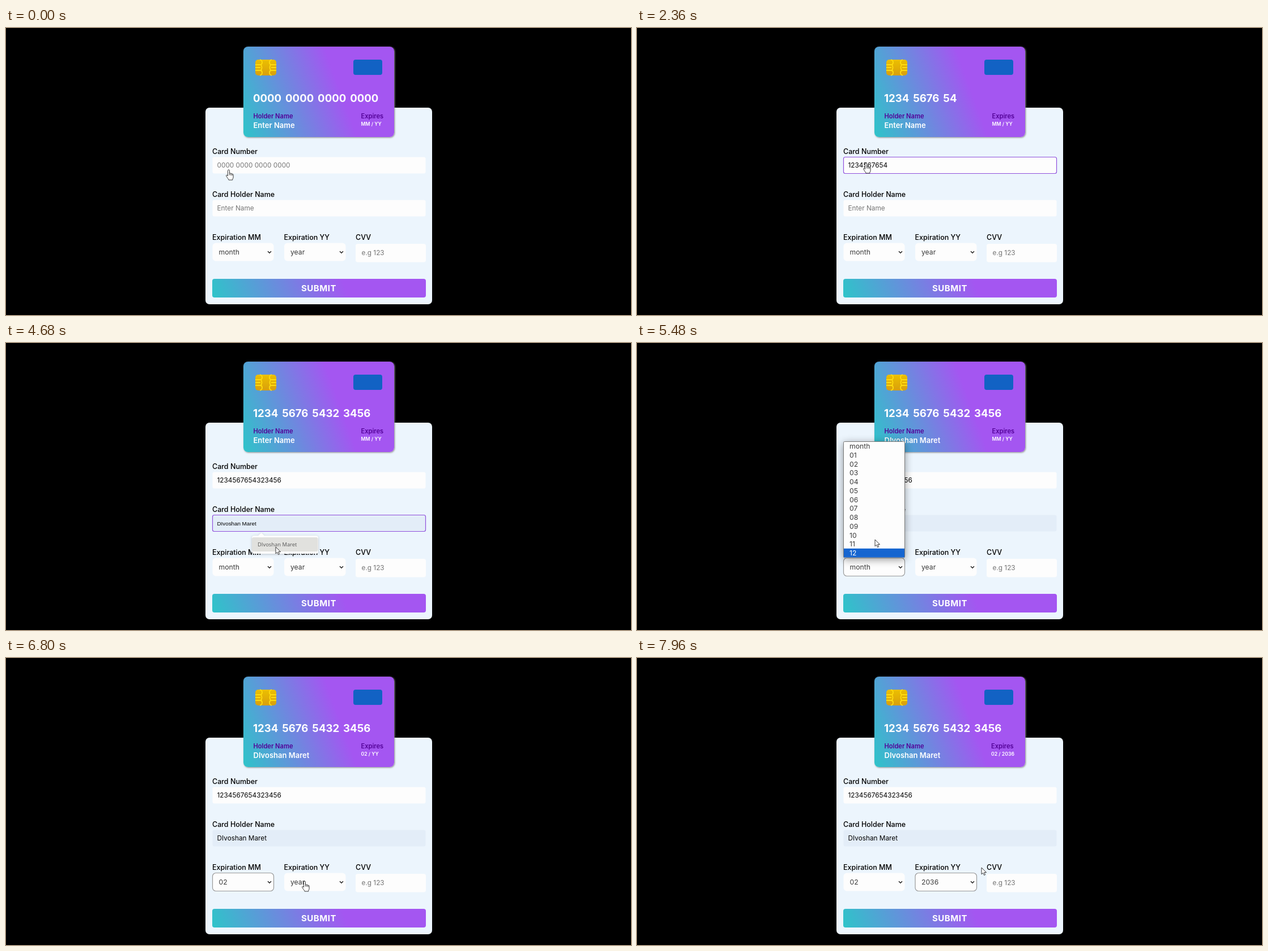
Write an HTML page that moves like this. It is 1103 by 508 pixels and loops after 8 s.

```html
<!DOCTYPE html>
<html lang="en">
<head>
<meta charset="utf-8">
<title>Card form</title>
<style>
  html, body { margin: 0; width: 100%; height: 100%; overflow: hidden; background: #000; }
  div, svg { position: absolute; }
  svg { left: 0; top: 0; }
  .form { left: 352px; top: 141px; width: 400px; height: 348px; border-radius: 7px; background: #ecf5fd; }
  .fill { background: linear-gradient(70deg, #2ec4c9, #a456f1 62%); }
  .card { left: 419px; top: 33px; width: 266px; height: 160px; border-radius: 8px; box-shadow: 1px 1px 3px #8a8a8a; }
  .button { left: 364px; top: 444px; width: 377px; height: 33px; border-radius: 4px; }
  text { font: 400 11.8px Inter, "Open Sans", sans-serif; fill: #000; white-space: pre; }
  .label { font-size: 12.5px; font-weight: 500; }
  .hint { fill: #757575; }
  .pick { font-size: 12.2px; fill: #3a3a3a; }
  .number { font-size: 18.6px; font-weight: 700; fill: #fff; word-spacing: 2.5px; }
  .cap { font-size: 11.1px; font-weight: 600; fill: #520097; }
  .name { font-size: 13px; font-weight: 600; fill: #fff; }
  .date { font-size: 8.7px; font-weight: 600; fill: #fff; }
  .submit { font-size: 15px; font-weight: 700; fill: #fff; letter-spacing: .5px; text-anchor: middle; }
  .preview { font: 9.8px "Liberation Sans", sans-serif; }
  .tip { font: 9.4px "Open Sans", sans-serif; fill: #555; }
  .list { filter: drop-shadow(0 3px 7px rgba(0, 0, 0, .4)); }
  .suggest { filter: drop-shadow(0 1px 2px rgba(0, 0, 0, .2)); }
  .pointer path { fill: #fff; stroke: #222; stroke-width: .9; stroke-linejoin: round; }
</style>
</head>
<body>
<div class="form"></div>
<div class="fill card"></div>
<div class="fill button"></div>
<svg id="stage" width="1103" height="508" viewBox="0 0 1103 508"></svg>
<script>
const LOOP = 8000, ROW = 15.73, LIST_BOTTOM = 379.5;
const HOLDER = 'DIvoshan Maret', DIGITS = '1234567654323456';
const TYPE_START = 1440, TYPE_STEP = 98;

// Pointer tip: time, x, y, shape from then on
const PATH = [
  [0, 393, 251, 'hand'], [120, 393, 251, 'hand'], [800, 404, 239, 'hand'],
  [3060, 404, 239, 'hand'], [3460, 409, 332, 'hand'], [3560, 409, 332, 'hand'],
  [3760, 421, 316, 'hand'], [4080, 423, 316, 'hand'], [4360, 452, 342, 'arrow'],
  [4620, 476, 361, 'arrow'], [4820, 476, 361, 'arrow'], [5120, 422, 396, 'hand'],
  [5280, 421, 394, 'arrow'], [5380, 421, 384, 'arrow'], [5480, 420, 348, 'arrow'],
  [6140, 405, 213, 'arrow'], [6360, 405, 213, 'arrow'], [6520, 455, 310, 'arrow'],
  [6680, 519, 385, 'hand'], [6780, 527, 395, 'hand'], [6960, 527, 395, 'arrow'],
  [7460, 541, 308, 'arrow'], [7680, 541, 308, 'arrow'], [7940, 608, 371, 'arrow'],
  [8000, 608, 371, 'arrow']
];

const rect = (x, y, w, h, r, fill, more = '') =>
  `<rect x="${x}" y="${y}" width="${w}" height="${h}" rx="${r}" fill="${fill}" ${more}/>`;
const text = (x, y, cls, str, id = '') =>
  `<text x="${x}" y="${y}" class="${cls}" id="${id}">${str}</text>`;
const chevron = x =>
  `<path d="M${x - 3} 395.3l3 3 3-3" fill="none" stroke="#222" stroke-width="1.5"/>`;
const outline = (id, color, w = 1.2) => `id="${id}" stroke="${color}" stroke-width="${w}"`;

function list(id, x, rows) {
  const h = rows.length * ROW, top = LIST_BOTTOM - h;
  const items = rows.map((r, i) =>
    text(x + 11, top + i * ROW + 12.2, i ? 'pick' : 'pick hint', r)).join('');
  return `<g id="${id}" class="list">` +
    rect(x + .5, top - .5, 108, h + 1, 2, '#fdfdfd', 'stroke="#777"') +
    rect(x + 1, top, 107, ROW, 0, '#1565d0', `id="${id}Bar"`) + items + '</g>';
}

const months = ['month', ...Array.from({ length: 12 }, (_, i) => String(i + 1).padStart(2, '0'))];
const years = ['year', ...Array.from({ length: 20 }, (_, i) => String(2021 + i))];

const chip = `<defs><linearGradient id="gold" x2="0" y2="1">
    <stop stop-color="#ecc000"/><stop offset="1" stop-color="#d99f0c"/></linearGradient></defs>` +
  rect(440, 56, 37, 28, 5, 'url(#gold)') +
  `<path fill="none" stroke="#ffdc10" stroke-width="1.8" d="M440 65h8q4 0 4-4t-4-5M440 75h8q4 0 4 4t-4 5
    M477 65h-8q-4 0-4-4t4-5M477 75h-8q-4 0-4 4t4 5M440 70h9M468 70h9M450 65q3 5 0 10M467 65q-3 5 0 10"/>`;

document.getElementById('stage').innerHTML =
  chip + rect(613, 56, 51, 27, 4, '#1262c4') +
  text(436, 131, 'number', '', 'number') +
  text(436.5, 160, 'cap', 'Holder Name') + text(436.5, 176.5, 'name', '', 'name') +
  text(626.5, 160, 'cap', 'Expires', 'expires') + text(626.5, 173, 'date', '', 'date') +
  text(364, 222.5, 'label', 'Card Number') +
  text(364, 299, 'label', 'Card Holder Name') +
  text(364, 374.7, 'label', 'Expiration MM') +
  text(490.5, 374.7, 'label', 'Expiration YY') +
  text(617, 374.7, 'label', 'CVV') +
  rect(364.5, 228.5, 376, 29, 3, '#fdfdfd', outline('numberBox', '#8f4fdc')) +
  text(372.5, 246.8, '', '', 'numberText') +
  rect(364.5, 304.5, 376, 29, 3, '#fdfdfd', outline('holderBox', '#8f4fdc')) +
  text(372.5, 323, '', '', 'holderText') +
  rect(364.5, 380.5, 108, 32, 6, '#fdfdfd', outline('monthBox', '#999')) +
  rect(491, 380.5, 108.5, 32, 6, '#fdfdfd', outline('yearBox', '#999')) +
  rect(617, 382, 124, 32.5, 4, '#fdfdfd') +
  text(375.5, 401.2, 'pick', '', 'monthText') + text(502, 401.2, 'pick', '', 'yearText') +
  chevron(465) + chevron(592) +
  text(627.5, 401.7, 'hint', 'e.g 123') +
  text(552, 466, 'submit', 'SUBMIT') +
  `<g id="suggest" class="suggest"><path d="M444 342l6.500-6 6.500 6z" fill="#fdfdfd"/>` +
  rect(434, 341, 117, 32, 4, '#fdfdfd') +
  rect(434, 344, 116.500, 25, 3, '#e1e1de', 'id="suggestBar"') +
  text(444, 359.8, 'tip', HOLDER) + '</g>' +
  list('monthList', 364, months) + list('yearList', 490.5, years) +
  `<g id="pointer" class="pointer">
    <path id="hand" d="M-1.500 10V1.500a1.500 1.500 0 0 1 3 0V6.500a1.300 1.300 0 0 1 2.400.5 1.300 1.300 0 0 1 2.300.6
      1.200 1.200 0 0 1 1.900 1V13q0 2-1.300 3.500V18H0q-.5-1.800-2-3.500l-2.200-3.400q-.6-1.900.9-1.800 1 .2 1.800 1.600z
      M1.500 6.500v3M3.900 7v3M6.200 7.600v2.800"/>
    <path id="arrow" d="M0 0V11.800L2.700 9.300l1.900 4.200 2-.9-1.900-4h3.800z"/>
  </g>`;

const el = id => document.getElementById(id);
const show = (id, on) => { el(id).style.display = on ? '' : 'none'; };
const put = (id, str, cls) => {
  if (el(id).textContent !== str) el(id).textContent = str;
  if (cls !== undefined) el(id).setAttribute('class', cls);
};
const focus = (id, on) => { el(id).style.strokeOpacity = on ? 1 : 0; };
const within = (t, a, b) => t >= a && t < b;

function pointerAt(t) {
  let i = 0;
  while (i < PATH.length - 2 && t >= PATH[i + 1][0]) i++;
  const [t0, x0, y0, shape] = PATH[i], [t1, x1, y1] = PATH[i + 1];
  const p = Math.max(0, Math.min(1, (t - t0) / (t1 - t0))), e = p * p * (3 - 2 * p);
  return { x: x0 + (x1 - x0) * e, y: y0 + (y1 - y0) * e, shape };
}

// Highlight trails the pointer slightly
function hoverRow(id, count, t, open) {
  show(id, open);
  const top = LIST_BOTTOM - count * ROW;
  const row = Math.floor((pointerAt(t - 60).y - top) / ROW);
  const active = open && row > 0 && row < count;
  show(id + 'Bar', active);
  el(id + 'Bar').setAttribute('y', top + row * ROW);
  const items = el(id).querySelectorAll('text');
  items.forEach((item, i) => { item.style.fill = active && i === row ? '#fff' : ''; });
}

function render(t) {
  const typed = DIGITS.slice(0, Math.max(0, Math.floor((t - TYPE_START) / TYPE_STEP) + 1));
  put('number', typed ? typed.match(/.{1,4}/g).join(' ') : '0000 0000 0000 0000');
  put('numberText', typed || '0000 0000 0000 0000', typed ? '' : 'hint');
  focus('numberBox', within(t, 960, 3800));

  const hover = within(t, 4400, 4840), filled = t >= 4840;
  put('name', filled ? HOLDER : 'Enter Name');
  put('holderText', hover || filled ? HOLDER : 'Enter Name', hover ? 'preview' : filled ? '' : 'hint');
  el('holderBox').setAttribute('fill', hover || filled ? '#e3edf8' : '#fdfdfd');
  focus('holderBox', within(t, 3800, 5240));
  show('suggest', within(t, 3920, 4840));
  show('suggestBar', hover);

  const month = t >= 6360 ? '02' : '', year = t >= 7720 ? '2036' : '';
  put('date', `${month || 'MM'} / ${year || 'YY'}`);
  for (const id of ['date', 'expires']) el(id).setAttribute('x', year ? 625 : 626.5);
  put('monthText', month || 'month');
  put('yearText', year || 'year');
  focus('monthBox', within(t, 5240, 6900));
  focus('yearBox', t >= 6900);
  hoverRow('monthList', months.length, t, within(t, 5280, 6360));
  hoverRow('yearList', years.length, t, within(t, 6960, 7720));

  const { x, y, shape } = pointerAt(t);
  el('pointer').setAttribute('transform', `translate(${x.toFixed(2)} ${y.toFixed(2)})`);
  show('hand', shape === 'hand');
  show('arrow', shape === 'arrow');
}

const start = performance.now();
function tick() {
  render((performance.now() - start) % LOOP);
  requestAnimationFrame(tick);
}
tick();
</script>
</body>
</html>
```
